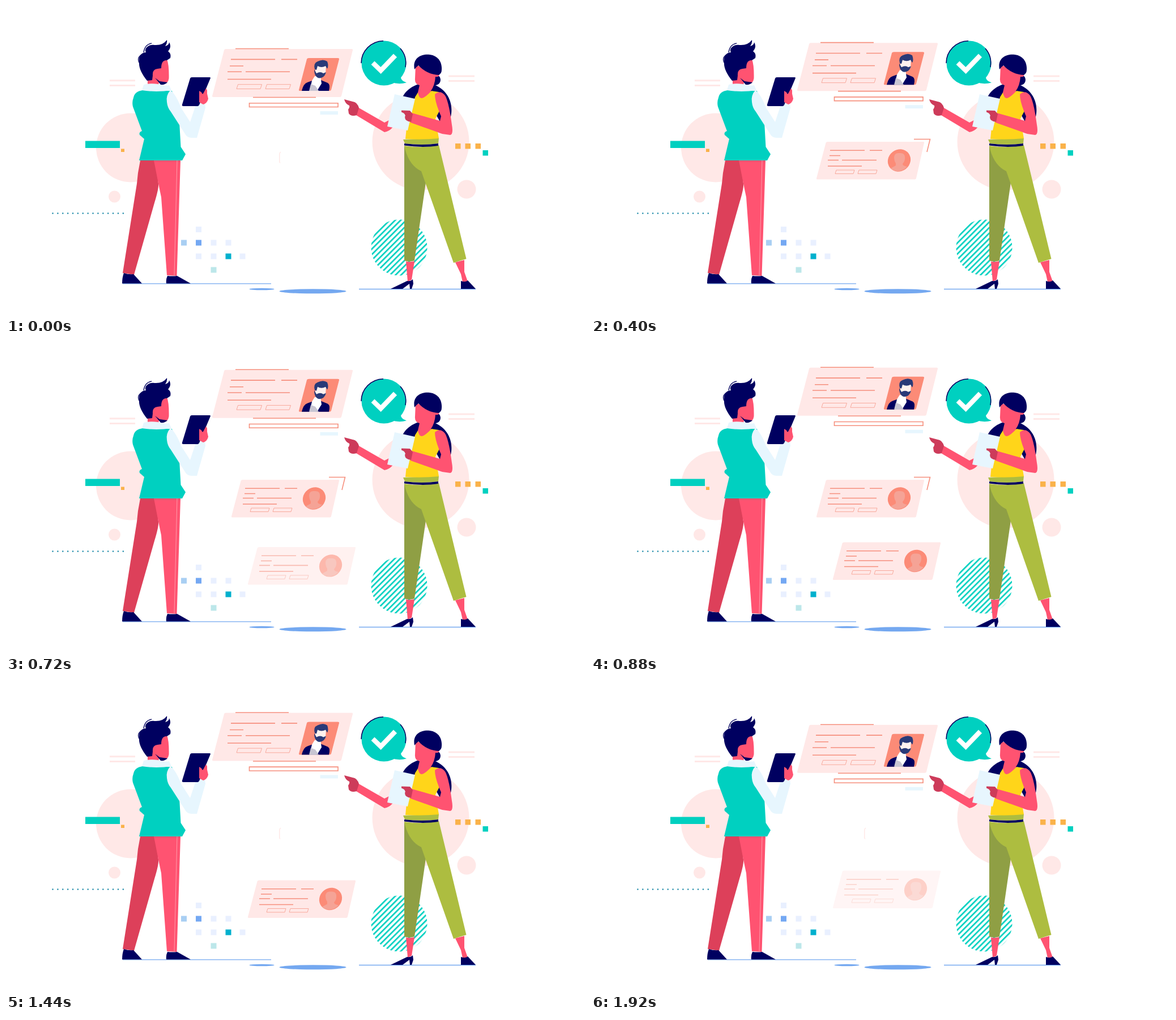
Write an HTML page that moves like this. It is 1022 px wide and 548 px high and loops after 2000 ms.

```html
<!DOCTYPE html>
<html lang="en">
<head>
<meta charset="utf-8">
<title>Profile check</title>
<style>
html, body { margin: 0; width: 100%; height: 100%; overflow: hidden; background: #fff; }
svg { display: block; width: 100%; height: 100%; }
.peach { fill: #ffe8e7; } .teal { fill: #00d0c0; } .navy { fill: #000060; }
.skin { fill: #ff5371; } .shade { fill: #cd3b5a; } .ice { fill: #e7f6fe; }
.olive { fill: #adbd40; } .moss { fill: #8f9f44; } .gold { fill: #fab24a; }
.blue { fill: #74a8f0; } .salmon { fill: #fc8b77; }
.line { fill: none; stroke: #f68f7d; stroke-width: 1.6; }
.thin { fill: none; stroke: #f8a99c; stroke-width: 1; }
.soft { fill: none; stroke: #ffe8e7; stroke-width: 3; }
.ground { stroke: #74a8f0; stroke-width: 1.3; }
.round { stroke-linejoin: round; }
</style>
</head>
<body>
<svg viewBox="0 0 1022 548" preserveAspectRatio="none">
  <defs>
    <pattern id="stripes" width="6.9" height="10" patternUnits="userSpaceOnUse" patternTransform="rotate(45)">
      <rect width="2.7" height="10" class="teal"/>
    </pattern>
    <g id="card">
      <path class="peach" d="M418,240H586.5Q588.5,240 588,242L574,304.5Q573.5,306.5 571.5,306.5H399.5Q397.5,306.5 398,304.500L414.500,242Q415,240 418,240Z"/>
      <path class="line" d="M422,255.300H483M492,255.300H514M421,264.500H440M418,272.500H437M443,272.500H504M418,283H478"/>
      <path class="thin" d="M433,290H465L463,296.500H431ZM473,290H505L503,296.500H471Z"/>
      <ellipse class="salmon" cx="544" cy="273" rx="20.8" ry="19" transform="rotate(-38 544 273)"/>
      <path fill="#f5a396" d="M535,267Q536,259 544,260Q553,259 554,266Q555,274 550,279Q550,283 558,284Q551,292 541,292Q533,291 529,287L538,282V278Q535,274 535,267Z"/>
    </g>
  </defs>

  <!-- backdrop -->
  <g class="peach">
    <circle cx="220" cy="250.500" r="61"/><circle cx="191.500" cy="337" r="10.500"/>
    <circle cx="732" cy="240" r="85.500"/><circle cx="813" cy="324" r="16.500"/>
  </g>
  <path class="soft" d="M183,131.700H228M183,140.500H228M781,124H827M781,132.500H827"/>
  <path class="teal" d="M140,238.500H201V251H140ZM841.500,255H851V264.500H841.500Z"/>
  <path class="gold" d="M203,252.500H209V258H203ZM793,243H802.500V252.500H793ZM810.500,243H820V252.500H810.500ZM828.500,243H838V252.500H828.500Z"/>
  <g id="dots" fill="#1d8aa8"></g>
  <g id="squares"></g>
  <circle cx="694" cy="427" r="49.500" fill="url(#stripes)"/>
  <path class="ground" d="M206,490.800H468M623,500.500H829"/>
  <ellipse class="blue" cx="451.500" cy="500.500" rx="22" ry="1.700"/>
  <ellipse class="blue" cx="541.500" cy="504.300" rx="59" ry="4"/>

  <!-- man -->
  <path fill="#dd405a" d="M237,273L233,295L231,314L206,472L226,475L262,348Q270,322 269,314L264,273Z"/>
  <path class="skin" d="M261,273H308L301.500,477L284,476L274,338L269,314Z"/>
  <path d="M302,273L297,476" stroke="#ff9aa9" fill="none"/>
  <path class="navy" d="M208,472Q216,475 225,474L240,490.500H205Q205,480 208,472ZM285,477Q294,478 302,477L326,490.500H283Q282,483 285,477Z"/>
  <path class="teal" d="M241,149Q227,151 225,162Q222,170 224,178L240,221Q234,223 236,228L244,235L235,273H311L317,262L308.500,249L306,205L293,150Z"/>
  <path class="ice" d="M290,149Q282,158 284,170Q285,180 291,187L318,229Q322,233.500 330,233H337L352,180L351,172L344,167L336,172L325,205L309,180Q300,156 290,149Z"/>
  <path class="skin" d="M258,107L284,94Q288,104 287.500,128Q286,137 280,136L270,135L269,140H250V131Z"/>
  <path class="ice" d="M240,149L243,139Q256,136 268,138Q279,142 288,140L292,149Q265,153 240,149Z"/>
  <path class="navy" d="M263,127L271,133L285,135Q280,140 273,139ZM249,132Q234,113 235,100C233,88 240,82 247,82C243,76 251,67 262,69Q277,70 284,60Q285,66 281,71Q288,69 288,64Q293,72 286,80Q292,84 290,92L284,96Q274,95 274,110L267,111Q258,112 259,123L258,131Z"/>
  <path d="M236,102Q229,91 242,84M243,82Q245,68 257,66" fill="none" stroke="#000060" stroke-width="1.300"/>
  <path class="navy" d="M328,126H359.500Q361.500,126 360.700,128L341,175Q340,177 338,177H313Q310,177 311,174L325,128Q325.600,126 328,126Z"/>
  <path class="skin" d="M341,150L345,152.500Q347,158 349,153L353,145.500L355,149V155L357,164Q355,172 348,174L341,170Z"/>

  <!-- woman -->
  <path class="navy" d="M728,138Q706,146 699,163L722,172L740,150ZM749,137C774,143 789,165 786,190Q784,208 771,213L752,180ZM753,123Q766,120 767,130Q767,138 759,140L750,140Z"/>
  <path class="skin" d="M723,104L764,120Q766,126 758,125Q757,140 750,150V158L733,165L726,157L730,140Q721,138 722,128Z"/>
  <path class="navy" d="M721,112C717,92 733,84 748,86C764,88 770,101 769,113Q769,119 764,122Q743,121 728,105Q724,108 721,112Z"/>
  <path class="moss" d="M703,247V450Q712,453 721,450L741,312L734,289Z"/>
  <path class="skin" d="M706,451.500Q714,453 721,451L716,484L709,487ZM793,453L809,449V470L815,487L806,488L803,474Z"/>
  <path class="olive" d="M703,247Q735,252 764,246L812.500,447Q802,450 790,454L733,292Q710,281 703,247ZM701,236L764,233.500L763,243Q735,247 704,243Z"/>
  <path class="yellow" fill="#ffd51a" d="M727,153Q729,163 734,163Q740,162 751,150L764,152L768,180L758,199L764,234Q735,237 705,235L707,215L722,161Z"/>
  <path class="navy" d="M703,243Q735,247 763,243V247Q735,251 703,246.500ZM679,500L708,486Q714,487 718,483L719,491L716,500H713L712,491L700,500ZM803,486Q811,489 815,485L829,500H803Z"/>
  <path class="skin" d="M757,156Q766,148 774,157Q781,165 787,210Q790,227 784,228L770,226L714,206L716,189L766,203L768,195Q757,170 757,156ZM621,179L668,206L676,202L683,214Q676,222 668,223L618,193Z"/>
  <path class="ice" d="M686,156L722,164L709,220L673,213Z"/>
  <path class="skin" d="M714,189L740,196V215L714,205Z"/>
  <path class="shade" d="M597,165L612,169Q620,170 623,180L619,193Q609,196 605,190L604,183Q607,179 606,176Q599,173 597,165ZM698,184.500L713,185L718,191L715,205Q704,204 704,196Q707,191 698,187.500Z"/>

  <!-- approval bubble -->
  <circle class="teal" cx="667" cy="101" r="39.500"/>
  <path class="teal" d="M680,135Q694,139 707,135.500Q696,132 697,124Z"/>
  <path d="M627,101A39.500,39.500 0 0 1 666,61.700M696,75A39.500,39.500 0 0 1 705,108" fill="none" stroke="#000060" stroke-width="1.500"/>
  <path d="M647.500,100.500L661.500,114L687,87.500" fill="none" stroke="#fff" stroke-width="8.500"/>

  <!-- floating cards -->
  <path id="trace" d="M485,258Q482.800,259 482.800,262V276L484,277.500" fill="none" stroke="#ffe3e1" stroke-width="1.200"/>
  <g id="first">
    <use href="#card"/>
    <path class="line" d="M570,235.500H598.500L593,258"/>
  </g>
  <use id="second" href="#card"/>
  <g id="profile">
    <path class="peach" d="M388,76H610Q612.500,76 612,78L592,159Q591.500,161 589,161H366Q363.500,161 364,159L385,78Q385.500,76 388,76Z"/>
    <path class="line" d="M405,75.500H499M397,94.400H475M486,94.400H514M395,106H419M391,116.300H416M423,116.300H501M391,129.500H468M436,161.500H547"/>
    <path class="line" d="M429.500,171.700H586V178.500H429.500Z"/>
    <path class="thin" d="M409.500,138.700H451.500L449,146.500H407ZM460.500,138.700H502.500L500,146.500H458Z"/>
    <path class="ice" d="M554.500,186H586V192H554.500Z"/>
    <path class="salmon" d="M535,92H585.500Q588.500,92 588,94L574,148Q573.500,150 571,150H519Q516.500,150 517,148L531,94Q531.500,92 535,92Z"/>
    <path class="navy" d="M522,150Q525,137 532,135L543,131H556L568,136Q573,139 570,150Z"/>
    <path fill="#fff" d="M540,132L545,124H555L557,137L549,150H536Z"/>
    <path fill="#c8c5d2" d="M538,138L546,141L552,150H535Z"/>
    <path fill="#fff2ef" d="M546,106Q555,101 565,106L564,120Q555,126 546,121Z"/>
    <path fill="#293a78" d="M545,112Q542,101 550,98Q560,93 567,98Q570,106 567,111L564,106Q557,110 550,106L548,113ZM544,112L548,119Q555,115 560,119L565,117Q562,127.500 553,127.500Q544,126 544,112Z"/>
  </g>
</svg>
<script>
const $ = id => document.getElementById(id);
const LOOP = 2000;

$('dots').innerHTML = Array.from({ length: 15 },
  (_, i) => `<circle cx="${82.5 + i * 8.88}" cy="366.500" r="1.250"/>`).join('');

const pale = '#e9f0ff';
$('squares').innerHTML = [
  [340, 395, pale], [314, 418.5, '#a9cff3'], [340, 418.5, '#74a8f3'], [366.5, 418.5, pale], [392.5, 418.5, pale],
  [340, 442.5, pale], [366.5, 442.5, pale], [392.5, 442.5, '#00b0cd'], [417.5, 442.5, pale], [366.5, 466.5, '#bce7ea']
].map(([x, y, fill]) => `<rect x="${x - 5}" y="${y - 5}" width="10" height="10" fill="${fill}"/>`).join('');

const clamp = v => Math.min(1, Math.max(0, v));

// cubic-bezier(.5, 0, .5, 1), solved by bisection
function ease(x) {
  let low = 0, high = 1;
  for (let i = 0; i < 24; i++) {
    const s = (low + high) / 2;
    if (1.5 * s * (1 - s) + s ** 3 < x) low = s; else high = s;
  }
  return low * low * (3 - 2 * low);
}

// Cards rise while fading in, hold, then rise while fading out.
function place(id, t, start, end, x, y) {
  const enter = clamp((t - start) / 200), leave = clamp((t - end) / 200);
  const shift = 28 * (1 - ease(enter)) - 28 * leave;
  $(id).setAttribute('transform', `translate(${x} ${y + shift})`);
  $(id).setAttribute('opacity', enter * (1 - leave));
}

function draw(now) {
  const t = now % LOOP;
  const rise = ease(1 - Math.abs(t / 1000 - 1));
  $('profile').setAttribute('transform', `translate(0 ${-35 * rise})`);
  place('first', t, 40, 1240, 0, 0);
  place('second', t, 600, 1800, 29, 110.5);
  $('trace').setAttribute('opacity', t < 40 || t > 1440 ? 1 : 0);
}

const begin = performance.now();
function tick() {
  draw(performance.now() - begin);
  requestAnimationFrame(tick);
}
tick();
</script>
</body>
</html>
```
